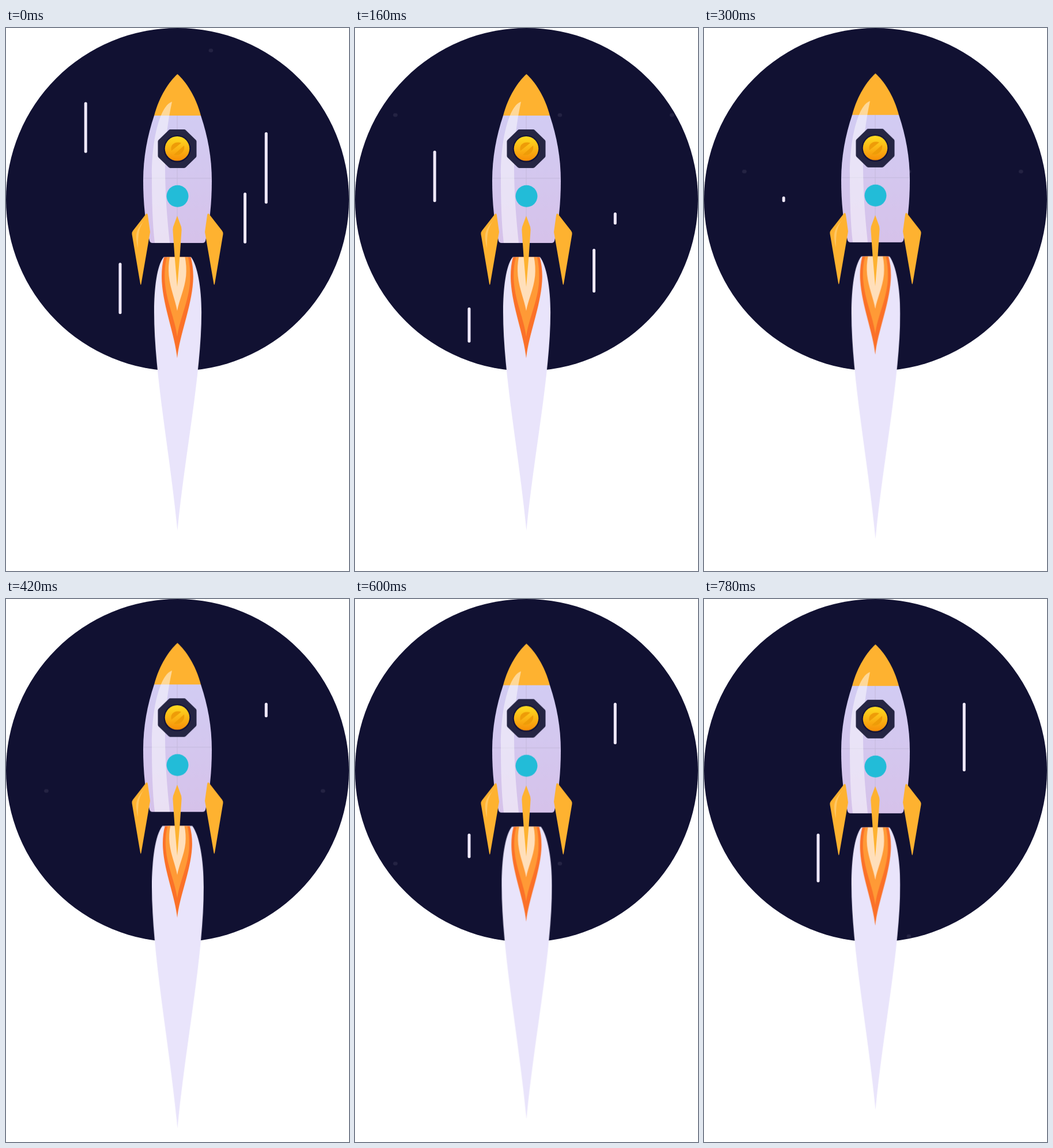
Animation, 595 px wide and 942 px high, one loop 800 ms. Source, as an HTML page:

```html
<!DOCTYPE html>
<html lang="en">
<head>
<meta charset="utf-8">
<title>Rocket</title>
<style>
  html, body { margin: 0; width: 100%; height: 100%; overflow: hidden; background: #fff; }
  svg { display: block; width: 595px; height: 942px; }

  /* Engine shake: five up-and-down cycles per loop */
  .rocket, .trail, .flame {
    transform-origin: 297.3px 397.5px;
    animation: 80ms linear infinite alternate;
  }
  .rocket { animation-name: lift; }
  .trail { animation-name: stretch; }
  .flame { animation-name: shrink; }
  @keyframes lift { to { transform: translateY(-5px); } }
  @keyframes stretch { to { transform: translateY(-5px) scale(1.13, 1.1457); } }
  @keyframes shrink { to { transform: translateY(-5px) scale(.903, .873); } }

  .stars { fill: #242343; animation: fall 800ms linear infinite; }
  @keyframes fall { to { transform: translateY(560px); } }

  .streaks { fill: #f0e9fc; }
  .streaks rect { width: 5px; rx: 2.5px; animation: 800ms linear infinite; }
  .s1 { animation-name: s1 !important; }
  .s2 { animation-name: s2 !important; }
  .s3 { animation-name: s3 !important; }
  .s4 { animation-name: s4 !important; }
  @keyframes s1 {
    0% { y: 128px; height: 88px; }
    12.5% { y: 171px; height: 108px; }
    17.5% { y: 198px; height: 104px; }
    27.5% { y: 254px; height: 48px; }
    37.5% { y: 292px; height: 10px; }
    39.9% { y: 297px; height: 5px; }
    40%, 100% { y: 297px; height: 0; }
  }
  @keyframes s2 {
    0% { y: 180px; height: 124px; }
    5.4% { y: 217px; height: 124px; }
    12.5% { y: 266px; height: 75px; }
    22.4% { y: 336px; height: 5px; }
    22.5% { y: 336px; height: 0; }
    42.4% { y: 180px; height: 0; }
    42.5% { y: 180px; height: 4px; }
    100% { y: 180px; height: 124px; }
  }
  @keyframes s3 {
    0% { y: 285px; height: 88px; }
    12.5% { y: 337px; height: 99px; }
    17.2% { y: 365px; height: 94px; }
    27.5% { y: 428px; height: 31px; }
    32.4% { y: 454px; height: 5px; }
    32.5%, 100% { y: 454px; height: 0; }
  }
  @keyframes s4 {
    0% { y: 407px; height: 89px; }
    12.5% { y: 437px; height: 90px; }
    27.5% { y: 531px; height: 33px; }
    32.4% { y: 559px; height: 5px; }
    32.5% { y: 559px; height: 0; }
    54.9% { y: 407px; height: 0; }
    55% { y: 407px; height: 5px; }
    100% { y: 407px; height: 89px; }
  }
</style>
</head>
<body>
<svg viewBox="0 0 595 942">
  <defs>
    <clipPath id="disc"><circle cx="297.5" cy="297.5" r="297.5"/></clipPath>
    <linearGradient id="hull" x1="0" y1="0" x2="0" y2="1">
      <stop offset="0" stop-color="#d2ccf3"/>
      <stop offset="1" stop-color="#d6c2ea"/>
    </linearGradient>
    <linearGradient id="glass" x1="0" y1="0" x2="0" y2="1">
      <stop offset="0" stop-color="#ffdd22"/>
      <stop offset="1" stop-color="#f78f08"/>
    </linearGradient>
  </defs>

  <circle cx="297.5" cy="297.5" r="297.5" fill="#111132"/>
  <g clip-path="url(#disc)">
    <g class="stars">
      <ellipse cx="70" cy="38.3" rx="3.9" ry="3.3"/>
      <ellipse cx="355.4" cy="38.3" rx="3.9" ry="3.3"/>
      <ellipse cx="549.8" cy="38.3" rx="3.9" ry="3.3"/>
    </g>
  </g>
  <g class="streaks">
    <rect class="s1" x="135.7"/>
    <rect class="s2" x="448.8"/>
    <rect class="s3" x="412.1"/>
    <rect class="s4" x="195.5"/>
  </g>

  <path class="trail" fill="#e9e4fb" d="M273.5 397.5C262 412 257 450 257 493C257 600 285 740 297.4 871C310 740 339 600 339 493C339 450 332 412 321 397.5Z"/>
  <g class="flame">
    <path fill="#fb7128" d="M274 397.5C270.5 410 269.5 425 270.3 440C273 485 293 533 297 573C301 533 321.500 485 324.500 440C325.500 425 324 410 320.500 397.500Z"/>
    <path fill="#ff9a36" d="M279 397.500C275.500 410 274.500 425 275.500 440C278 475 293.500 506 297 536C300.500 506 317 475 319.300 440C320 425 319 410 316 397.500Z"/>
    <path fill="#ffdfba" d="M284 397.500C282 408 281.500 419 282.500 430C285 453 294 473 297 491C300 473 310 453 312.300 430C313.300 419 312.500 408 310.500 397.500Z"/>
  </g>

  <g class="rocket">
    <path fill="url(#hull)" d="M257 152C245 188 238 225 238 265C238 305 242 340 249 369Q250 373 254 373H341Q345 373 346 369C353 340 357 305 357 265C357 225 350 188 338 152Z"/>
    <path fill="none" stroke="#c4b9dc" d="M297 152V373M238 260.800H357"/>
    <path fill="#feb230" d="M297.400 80C283 93 266 118 257 152H338C329 118 312 93 297.400 80Z"/>
    <path fill="#fff" fill-opacity=".5" d="M288 128C268 134 253 190 253 255C253 300 254 338 258 373H284C279 325 276 285 276 240C276 195 281 160 288 128Z"/>

    <path fill="#252543" stroke="#252543" stroke-width="8" stroke-linejoin="round" d="M285 180H309L326.500 197V222L309 239H285L267.500 222V197Z"/>
    <circle cx="297" cy="209.500" r="23.500" fill="#111138"/>
    <circle cx="297" cy="209.300" r="21.300" fill="url(#glass)"/>
    <path fill="#ee9c08" d="M287 213C284 203 293 196 304 199.500ZM291 220L309 204C311 214 302 223 291 220Z"/>

    <circle cx="297.500" cy="291.800" r="19" fill="#22bcd8"/>

    <path id="fin" fill="#feb230" d="M243 322.500Q245.500 320.500 246 325L250 354L234.500 444Q233.700 447 233 444L218.500 358Q218 354.500 220 352Z"/>
    <path fill="#ffc763" d="M243 331C231 343 229 355 229 382C223 358 225 349 243 331Z"/>
    <use href="#fin" transform="matrix(-1 0 0 1 595 0)"/>
    <path fill="#feb230" d="M297 326L304 345Q305 349 304.300 355L301.500 396L297 449L292.500 396L289.700 355Q289 349 290 345Z"/>
  </g>
</svg>
</body>
</html>
```
